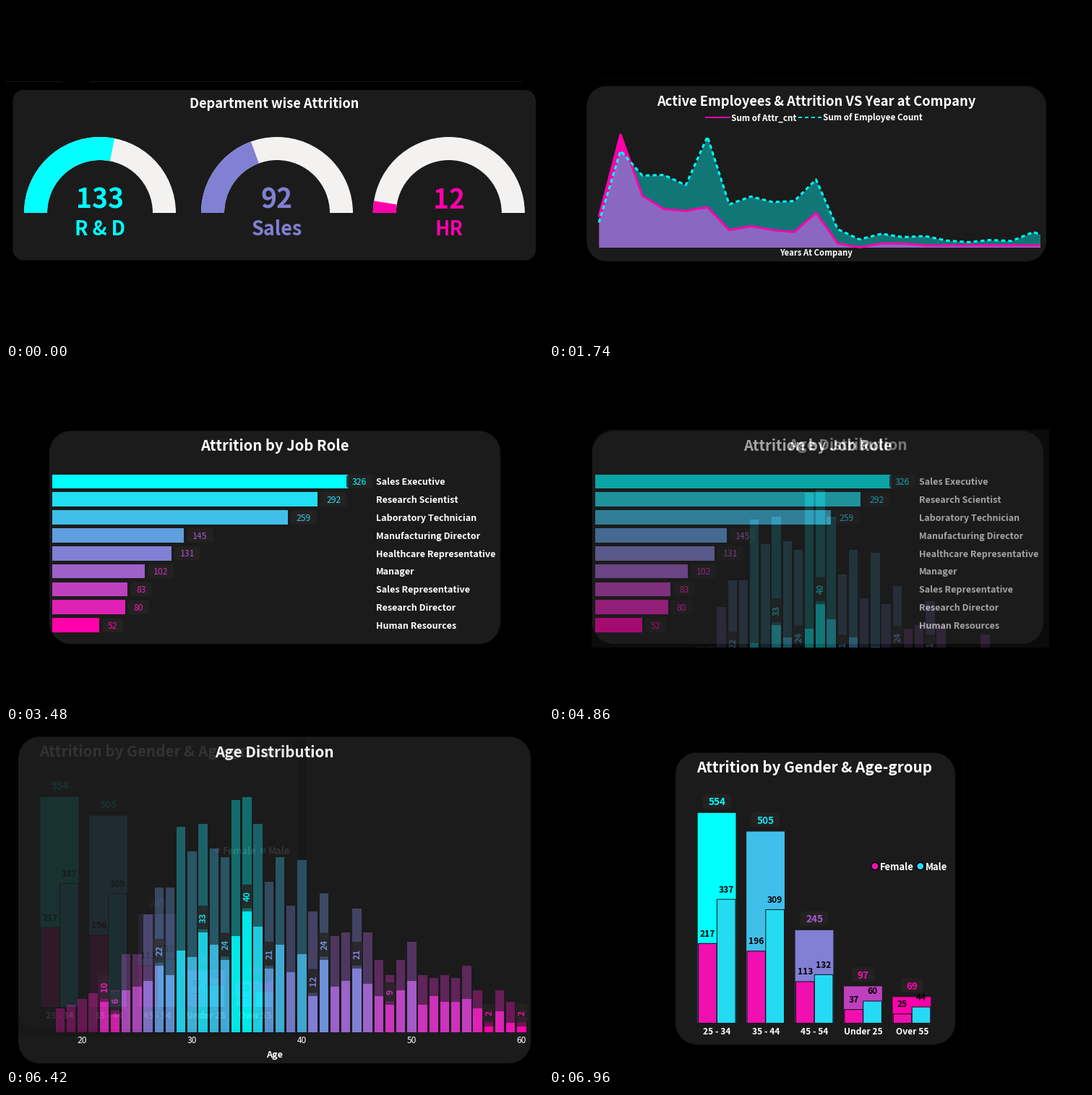
Animation of 743x463 px, one loop 8 s. Source, as a matplotlib script:

```python
import numpy as np
import matplotlib.pyplot as plt
from matplotlib.animation import FuncAnimation
from matplotlib.patches import Circle, Polygon, Rectangle, Wedge

W, H, DPI = 743, 463, 64
PT = 72 / DPI          # points per pixel
CAP = 0.733            # cap height of the font, in em
TICK, HOLD, STEP, STEPS, LOOP = 20, 1200, 60, 10, 8000

CARD, TAG, TRACK = "#1b1b1b", "#252423", "#f3f2f1"
CYAN, PINK = np.array([0, 1, 1]), np.array([1, 0, 2 / 3])

plt.rcParams["font.family"] = ["Noto Sans CJK JP", "DejaVu Sans"]
fig = plt.figure(figsize=(W / DPI, H / DPI), dpi=DPI, facecolor="black")


def stage():
    ax = fig.add_axes((0, 0, 1, 1))
    ax.set_xlim(0, W)
    ax.set_ylim(H, 0)
    ax.set_axis_off()
    return ax


def mix(t):
    """Pink at 0, cyan at 1."""
    return tuple(PINK + (CYAN - PINK) * t)


def scale(v, lo, hi):
    return mix((v - lo) / (hi - lo))


def text(ax, x, y, s, size, color="white", ha="center", weight="bold"):
    """Text whose capitals are centred on y."""
    ax.text(x, y + CAP * size / 2, s, fontsize=size * PT, color=color,
            ha=ha, va="baseline", weight=weight)


def upright(ax, x, y, s, size, color):
    ax.text(x + CAP * size / 2, y, s, fontsize=size * PT, color=color, ha="center",
            va="baseline", rotation=90, rotation_mode="anchor", weight="bold")


def panel(ax, x0, y0, x1, y1, r, color=CARD, alpha=1):
    """Box with circular corners."""
    a = np.linspace(0, np.pi / 2, 24)
    corners = [(x1 - r, y1 - r), (x0 + r, y1 - r), (x0 + r, y0 + r), (x1 - r, y0 + r)]
    pts = [np.column_stack((cx + r * np.cos(a + q * np.pi / 2),
                            cy + r * np.sin(a + q * np.pi / 2)))
           for q, (cx, cy) in enumerate(corners)]
    ax.add_patch(Polygon(np.vstack(pts), lw=0, fc=color, alpha=alpha))


def tag(ax, x, y, w, h):
    panel(ax, x - w / 2, y - h / 2, x + w / 2, y + h / 2, 4, TAG, 0.85)


def rect(ax, x, y, w, h, color, **kw):
    ax.add_patch(Rectangle((x, y), w, h, fc=color, **{"lw": 0, **kw}))


def rule(ax, y, spans, color):
    for a, b in spans:
        rect(ax, a, y, b - a, 1, color)


def gauges(ax):
    rule(ax, 104, [(0, 78), (116, 714)], "#181818")
    panel(ax, 9.5, 116, 733, 351.5, 15)
    text(ax, 371, 134.5, "Department wise Attrition", 18.2)
    parts = [(130, 133, "R & D", 1), (375, 92, "Sales", 0.5), (612.8, 12, "HR", 0)]
    total = sum(p[1] for p in parts)
    for x, n, name, t in parts:
        for sweep, color in ((180, TRACK), (180 * n / total, mix(t))):
            ax.add_patch(Wedge((x, 286), 105, 180, 180 + sweep, width=32, fc=color, lw=0))
        text(ax, x, 266, str(n), 37.3, mix(t))
        text(ax, x, 307, name, 27, mix(t))


def tenure(ax):
    rule(ax, 100, [(69, 240), (285, 455), (500, 670)], "#070707")
    panel(ax, 52, 110.5, 688, 353, 28)
    text(ax, 370, 131.5, "Active Employees & Attrition VS Year at Company", 18.3)
    left = [16, 59, 27, 20, 19, 21, 9, 11, 9, 8, 18, 2, 0, 2, 2] + [1] * 7
    staff = [44, 171, 127, 128, 110, 196, 76, 90, 80, 82, 120,
             32, 14, 24, 18, 20, 12, 9, 13, 11, 27, 14]
    base = 333.5
    years = 69 + 30.05 * np.arange(22)
    x = np.linspace(years[0], 679.5, 2000)
    y_left = base - 2.644 * np.interp(x, years, left)
    y_staff = base - 0.781 * np.interp(x, years, staff)
    area = Rectangle((68.5, 165), 611.5, base + 0.5 - 165, transform=ax.transData)
    ax.fill_between(x, y_staff, base, color=mix(1), alpha=0.4, lw=0)
    ax.fill_between(x, y_left, base, color=mix(0), lw=0)
    ax.fill_between(x, np.maximum(y_left, y_staff), base, color="#8a68c2", lw=0)
    ax.plot(x, y_left, color=mix(0), lw=3 * PT, solid_joinstyle="miter",
            solid_capstyle="butt", clip_path=area)
    ax.plot(x, y_staff, color=mix(1), lw=3 * PT, ls=(0, (1.8, 1.4)), clip_path=area)
    ax.plot([217, 250], [154, 154], color=mix(0), lw=2 * PT, snap=False)
    ax.plot([345, 378], [154, 154], lw=2 * PT, color=mix(1), ls=(0, (2.5, 2)), snap=False)
    text(ax, 252, 154, "Sum of Attr_cnt", 11.7, ha="left")
    text(ax, 379, 154, "Sum of Employee Count", 11.7, ha="left")
    text(ax, 369.5, 340.5, "Years At Company", 11.3)


def roles(ax):
    panel(ax, 60, 85.5, 684, 380, 30)
    text(ax, 371.5, 105.5, "Attrition by Job Role", 20.2)
    rows = [("Sales Executive", 326), ("Research Scientist", 292),
            ("Laboratory Technician", 259), ("Manufacturing Director", 145),
            ("Healthcare Representative", 131), ("Manager", 102),
            ("Sales Representative", 83), ("Research Director", 80),
            ("Human Resources", 52)]
    for i, (name, n) in enumerate(rows):
        y = 155.3 + 24.85 * i
        w = 1.258 * n
        rect(ax, 64, y - 9.8, w, 19.6, mix(1 - i / 8))
        tw = 36 if n > 99 else 29
        x = min(68 + w, 471) + tw / 2
        tag(ax, x, y, tw, 19.5)
        text(ax, x, y + 0.3, str(n), 12.2, scale(n, 52, 326), weight="normal")
        text(ax, 512, y + 0.3, name, 12.5, ha="left")


def ages(ax):
    panel(ax, 17, 6.5, 726, 458, 30)
    text(ax, 371.5, 27, "Age Distribution", 20.6)
    total = [8, 9, 11, 13, 16, 14, 26, 26, 39, 48, 48, 68, 60, 69, 61, 58, 77, 78, 69,
             50, 58, 42, 57, 40, 46, 32, 33, 41, 33, 24, 19, 24, 30, 19, 18, 19, 18,
             22, 14, 4, 14, 10, 5]
    part = [0, 0, 0, 0, 10, 6, 14, 15, 17, 22, 19, 27, 25, 33, 29, 24, 32, 40, 35,
            21, 29, 20, 26, 12, 24, 15, 17, 21, 16, 12, 9, 14, 17, 9, 12, 10, 10,
            11, 8, 2, 7, 3, 2]
    tagged = (22, 23, 27, 31, 33, 35, 37, 41, 42, 45, 48, 57, 60)
    base, unit = 415, 4.17
    place = lambda age: 105.4 + 15.2 * (age - 20)
    for age, (n, m) in enumerate(zip(total, part), 18):
        x, color = place(age), scale(n, 4, 78)
        rect(ax, x - 6.2, base - unit * n, 12.4, unit * n, color, alpha=0.4)
        rect(ax, x - 6.2, base - unit * m, 12.4, unit * m, color)
        if age in tagged:
            two = m > 9
            y = base - unit * m - (21 if two else 18.5)
            tag(ax, x, y, 16.5, 33 if two else 26)
            upright(ax, x, y, str(m), 12, color)
    for age in range(20, 61, 10):
        text(ax, place(age), 425.5, str(age), 12, weight="normal")
    text(ax, 371.5, 445, "Age", 12.6)


def genders(ax):
    rect(ax, 573, 40, 1, 375, "#060606")
    panel(ax, 175, 28.5, 562, 432, 30)
    text(ax, 367, 48.5, "Attrition by Gender & Age-group", 20.6)
    pink, blue = mix(1 / 16), mix(0.86)
    for x, name, color in ((451, "Female", pink), (513.8, "Male", blue)):
        ax.add_patch(Circle((x, 185.5), 5.2, fc=color, ec="black", lw=1.6 * PT))
        text(ax, x + 6.8, 186.3, name, 13, ha="left")
    groups = [("25 - 34", 217, 337), ("35 - 44", 196, 309), ("45 - 54", 113, 132),
              ("Under 25", 37, 60), ("Over 55", 25, 44)]
    base = 402.4
    for i, (name, f, m) in enumerate(groups):
        x, n = 205.7 + 67.45 * i, f + m
        top = base - 0.5245 * n
        rect(ax, x, top, 52.8, base - top, mix(1 - i / 4), snap=False)
        tag(ax, x + 26.5, top - 16.2, 38.5 if n > 99 else 31.5, 20)
        text(ax, x + 26.5, top - 15.6, str(n), 13.6, scale(n, 69, 554))
        for dx, v, color in ((0.8, f, pink), (26.7, m, blue)):
            h = 0.508 * v
            rect(ax, x + dx, base - h, 25.6, h, color, ec="black", lw=0.9 * PT, snap=False)
            text(ax, x + dx + 12.8, base - h - 13.9, str(v), 12, "black")
        text(ax, x + 27, 413.3, name, 12)


def render(draw):
    ax = stage()
    draw(ax)
    fig.canvas.draw()
    img = np.asarray(fig.canvas.buffer_rgba())[..., :3].astype(float)
    ax.remove()
    return img


# each picture with its box on the stage
SCENES = [(gauges, (0, 104, 743, 366)), (tenure, (45, 100, 695, 362)),
          (roles, (51, 77, 692, 385)), (ages, (9, 0, 743, 463)),
          (genders, (167, 22, 574, 443))]
pics = [render(draw) for draw, _ in SCENES]
boxes = [box for _, box in SCENES]


def fade(k, a):
    """Blend the next picture in, aligned to the corner of the current box."""
    (x, y, x1, y1), (u, v, u1, v1) = boxes[k], boxes[k + 1]
    w, h = min(x1 - x, u1 - u), min(y1 - y, v1 - v)
    out = pics[k].copy()
    out[y:y + h, x:x + w] *= 1 - a
    out[y:y + h, x:x + w] += a * pics[k + 1][v:v + h, u:u + w]
    return out


def update(i):
    k, t = divmod(i * TICK, HOLD + STEP * (STEPS - 1))
    img = pics[k] if t < HOLD else fade(k, ((t - HOLD) // STEP + 1) / STEPS)
    view.set_data(np.rint(img).astype(np.uint8))
    return [view]


view = stage().imshow(pics[0].astype(np.uint8), extent=(0, W, H, 0),
                      aspect="auto", interpolation="nearest")
anim = FuncAnimation(fig, update, frames=LOOP // TICK, interval=TICK,
                     repeat=True, repeat_delay=0, cache_frame_data=False)
plt.show()
```
